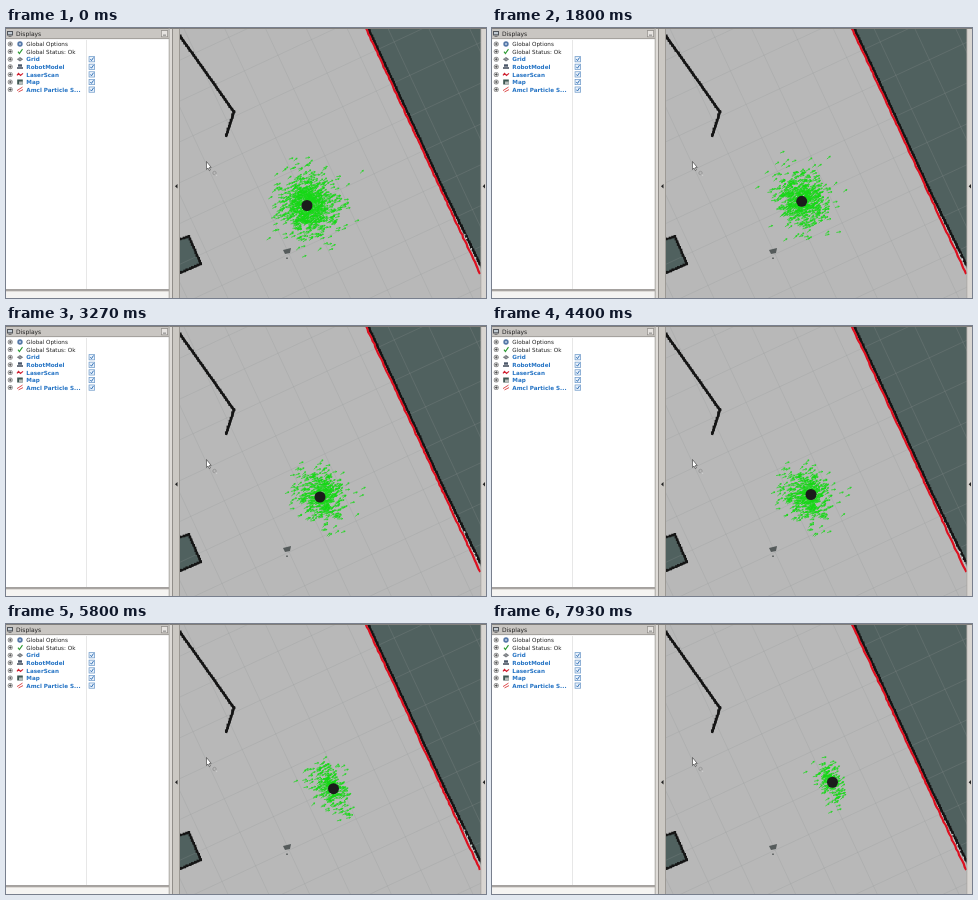
Recreate the animation shown at these times as an HTML page with a canvas. Size 480x270 px, loop 8 s.

```html
<!DOCTYPE html>
<html lang="en">
<head>
<meta charset="utf-8">
<title>Robot localisation</title>
<style>
  html, body { margin: 0; width: 100%; height: 100%; overflow: hidden; }
  canvas { display: block; width: 480px; height: 270px; }
</style>
</head>
<body>
<canvas id="stage" width="480" height="270"></canvas>
<script>
const ctx = document.getElementById('stage').getContext('2d');
const LOOP = 8000, STEP = 1000 / 15, HEADING = -25 * Math.PI / 180;
const FONT = '"DejaVu Sans", sans-serif';

// Robot path: time, x, y
const PATH = [[0, 301, 177.5], [1800, 309.7, 173.3], [3270, 314, 171], [4400, 319, 168.5],
  [5800, 327.5, 164.7], [6730, 333.5, 162], [8000, 341.3, 157.8]];

// Filter updates: the cloud holds still until the next one. Spread is along and across the heading.
const CLOUDS = [
  { at: 0,    x: 302, y: 177, along: 14.5, across: 15.5, count: 850 },
  { at: 1000, x: 310, y: 171, along: 12.5, across: 14, count: 600 },
  { at: 2700, x: 316, y: 170, along: 11.5, across: 13.5, count: 450 },
  { at: 5000, x: 324, y: 164, along: 8.5, across: 13.5, count: 260 },
  { at: 6200, x: 332, y: 161, along: 7, across: 12, count: 170 },
  { at: 7100, x: 338, y: 157, along: 5.5, across: 10.5, count: 165 }
];

function seeded(seed) {
  return () => {
    seed = (seed + 0x6D2B79F5) | 0;
    let n = Math.imul(seed ^ (seed >>> 15), 1 | seed);
    n = (n + Math.imul(n ^ (n >>> 7), 61 | n)) ^ n;
    return ((n ^ (n >>> 14)) >>> 0) / 4294967296;
  };
}

function rect(color, x, y, w, h) {
  ctx.fillStyle = color;
  ctx.fillRect(x, y, w, h);
}

function trace(points, closed) {
  ctx.beginPath();
  points.forEach(([x, y]) => ctx.lineTo(x, y));
  if (closed) ctx.closePath();
}

function line(color, width, points, closed) {
  trace(points, closed);
  ctx.strokeStyle = color;
  ctx.lineWidth = width;
  ctx.stroke();
}

function shape(color, points) {
  trace(points, true);
  ctx.fillStyle = color;
  ctx.fill();
}

function disc(color, x, y, r) {
  ctx.beginPath();
  ctx.arc(x, y, r, 0, Math.PI * 2);
  ctx.fillStyle = color;
  ctx.fill();
}

function text(value, x, y, size, color, weight = '') {
  ctx.font = `${weight} ${size}px ${FONT}`;
  ctx.fillStyle = color;
  ctx.fillText(value, x, y);
}

function gridLines() {
  ctx.save();
  ctx.translate(301, 177);
  ctx.rotate(HEADING);
  ctx.globalAlpha = 0.3;
  for (let d = -370; d <= 370; d += 37) {
    line('#909494', 0.7, [[d, -400], [d, 400]]);
    line('#909494', 0.7, [[-400, d], [400, d]]);
  }
  ctx.restore();
}

// Occupied cells give the walls a ragged edge.
function wall(points, width, seed) {
  const random = seeded(seed);
  line('#151515', width, points);
  for (let i = 1; i < points.length; i++) {
    const [x0, y0] = points[i - 1], [x1, y1] = points[i];
    const cells = Math.hypot(x1 - x0, y1 - y0) / 3;
    for (let c = 0; c < cells; c++) {
      const k = c / cells;
      rect('#151515', x0 + (x1 - x0) * k - 1.5 + random() - 0.5,
        y0 + (y1 - y0) * k - 1.5, 2.6, 2.6);
    }
  }
}

function drawMap() {
  rect('#b8b8b8', 174, 1, 301, 269);
  shape('#50615f', [[361, 1], [475, 1], [475, 241], [438, 163]]);
  shape('#50615f', [[174, 211], [183, 208], [196, 236], [174, 246]]);
  gridLines();
  wall([[174, 8], [228, 84], [220, 109]], 2.4, 4);
  wall([[172, 212], [183, 208.5], [195, 236], [172, 246]], 1.8, 7);
  wall([[362, 0], [400, 81], [438, 163], [475, 238]], 2, 9);
  shape('#555b5b', [[277, 222], [285, 220], [284, 225], [279, 226]]);
  rect('#6a6e6e', 280, 229.5, 2, 1.5);
}

function drawLaser(tick) {
  const random = seeded(tick * 97 + 5), points = [];
  for (let y = 0; y <= 247; y += 3) {
    points.push([359.8 + y * 0.465 + (random() - 0.5) * 0.9, y]);
  }
  line('#dc1020', 2.2, points);
  for (let i = 0; i < 4; i++) {
    const y = 200 + random() * 38;
    rect('#d5d5d5', 362.5 + y * 0.465, y, 1.2, 1.5);
  }
}

function drawCloud(cloud, index) {
  const random = seeded(31 + index);
  ctx.beginPath();
  for (let i = 0; i < cloud.count; i++) {
    const radius = Math.sqrt(-2 * Math.log(1 - random())), turn = random() * Math.PI * 2;
    const u = radius * Math.cos(turn) * cloud.along, v = radius * Math.sin(turn) * cloud.across;
    const x = cloud.x + u * Math.cos(HEADING) - v * Math.sin(HEADING);
    const y = cloud.y + u * Math.sin(HEADING) + v * Math.cos(HEADING);
    const angle = HEADING + (random() - 0.5) * 0.7;
    const dx = Math.cos(angle), dy = Math.sin(angle);
    ctx.moveTo(x - dx * 2.2, y - dy * 2.2);
    ctx.lineTo(x + dx * 2.2, y + dy * 2.2);
    ctx.moveTo(x + dx * 0.8 - dy * 0.8, y + dy * 0.8 + dx * 0.8);
    ctx.lineTo(x + dx * 2.2, y + dy * 2.2);
    ctx.lineTo(x + dx * 0.8 + dy * 0.8, y + dy * 0.8 - dx * 0.8);
  }
  ctx.strokeStyle = '#16d816';
  ctx.lineWidth = 0.7;
  ctx.stroke();
}

function robotAt(time) {
  const i = PATH.findIndex(p => p[0] > time);
  const [t0, x0, y0] = PATH[i - 1], [t1, x1, y1] = PATH[i];
  const k = (time - t0) / (t1 - t0);
  return [x0 + (x1 - x0) * k, y0 + (y1 - y0) * k];
}

function drawCursor() {
  const arrow = [[200.5, 133.5], [200.5, 141.5], [202, 140], [203.3, 142.6], [204.4, 142], [203.2, 139.6], [205.2, 139.4]];
  shape('#ffffff', arrow);
  line('#333333', 0.6, arrow, true);
  ctx.beginPath();
  ctx.arc(208.5, 145, 1.7, 0, Math.PI * 2);
  ctx.strokeStyle = '#8b8b8b';
  ctx.lineWidth = 0.7;
  ctx.stroke();
  line('#d8d8d8', 0.7, [[209.7, 146.2], [211, 148]]);
}

const ICONS = [
  y => { disc('#5578a8', 14, y, 2.7); disc('#c6d4e8', 14, y, 1); },
  y => line('#2a9a30', 1.1, [[12, y], [13.4, y + 2], [16.5, y - 2.5]]),
  y => { shape('#777b80', [[10.8, y], [14, y - 2.2], [17.2, y], [14, y + 2.2]]); line('#c5c8ca', 0.5, [[12.4, y - 1], [15.6, y + 1]]); },
  y => { rect('#4a5668', 12, y - 2.5, 4, 2.4); rect('#6c7480', 11, y + 0.2, 6, 2); },
  y => line('#d02030', 1.2, [[11, y + 1], [12.5, y - 1], [14.5, y + 1], [17, y - 1]]),
  y => { rect('#3f5753', 11.2, y - 2.5, 5.6, 5); rect('#b7bdbb', 13, y - 0.5, 3.8, 3); },
  y => { line('#d83a3a', 0.9, [[11, y + 1], [16.5, y - 2.5]]); line('#d83a3a', 0.9, [[12.5, y + 2.3], [17, y]]); }
];

function drawPanel() {
  rect('#dedbd7', 0, 0, 174, 270);
  rect('#ffffff', 0, 11, 163, 250.5);
  rect('#c9c6c2', 0, 0, 163, 11);
  rect('#817f7c', 0, 0, 480, 1);
  rect('#96938f', 0, 10.3, 163, 0.8);
  rect('#50545a', 1, 3, 6, 4.5);
  rect('#c0c9d1', 2, 4, 4, 2.3);
  rect('#666666', 2.5, 8, 3, 0.8);
  text('Displays', 10, 8.2, 6, '#222222');
  rect('#8b8884', 155, 2.2, 7, 7);
  rect('#e6e3e0', 155.7, 2.9, 5.6, 5.6);
  rect('#666666', 157, 6.7, 3, 0.8);
  rect('#e2e2e2', 80, 12, 0.8, 249);
  rect('#85827f', 0, 261.3, 163, 1.3);
  rect('#f5f4f2', 0, 264, 163, 6);
  rect('#a5a29e', 162.7, 0, 0.9, 270);
  rect('#918e8a', 166, 1, 1, 269);
  rect('#cbc8c3', 167, 1, 6, 269);
  rect('#9c9994', 173, 1, 1, 269);
  shape('#222222', [[171.5, 156], [171.5, 160.5], [169, 158.2]]);

  const labels = ['Global Options', 'Global Status: Ok', 'Grid', 'RobotModel', 'LaserScan', 'Map', 'Amcl Particle S...'];
  labels.forEach((label, i) => {
    const y = 16 + i * 7.6, display = i > 1;
    disc('#8a8a8a', 4.2, y, 2.5);
    disc('#eeeeee', 4.2, y, 1.8);
    rect('#333333', 2.8, y - 0.35, 2.8, 0.7);
    rect('#333333', 3.85, y - 1.4, 0.7, 2.8);
    ICONS[i](y);
    text(label, 20.3, y + 2.1, 5.65, display ? '#2473c4' : '#222222', display ? 'bold' : '');
    if (display) {
      rect('#6c98c8', 82.7, y - 3, 6.2, 6);
      rect('#e8f1fb', 83.4, y - 2.3, 4.8, 4.6);
      line('#2668b0', 0.9, [[84.3, y], [85.5, y + 1.4], [87.5, y - 1.7]]);
    }
  });
}

function drawRightEdge() {
  rect('#d8d5d1', 475, 1, 5, 269);
  rect('#a8a5a1', 474.5, 1, 0.8, 269);
  shape('#222222', [[479, 156], [479, 160.5], [476.7, 158.2]]);
}

function draw(now) {
  const time = now % LOOP, tick = Math.floor(time / STEP + 0.001);
  const index = CLOUDS.findLastIndex(c => c.at <= time);
  drawMap();
  drawLaser(tick);
  drawCloud(CLOUDS[index], index);
  const [x, y] = robotAt(Math.min(tick * STEP, LOOP - 1));
  disc('#1c1c1c', x, y, 5.5);
  drawCursor();
  drawPanel();
  drawRightEdge();
}

const start = performance.now();
function frame() {
  draw(performance.now() - start);
  requestAnimationFrame(frame);
}
frame();
</script>
</body>
</html>
```
